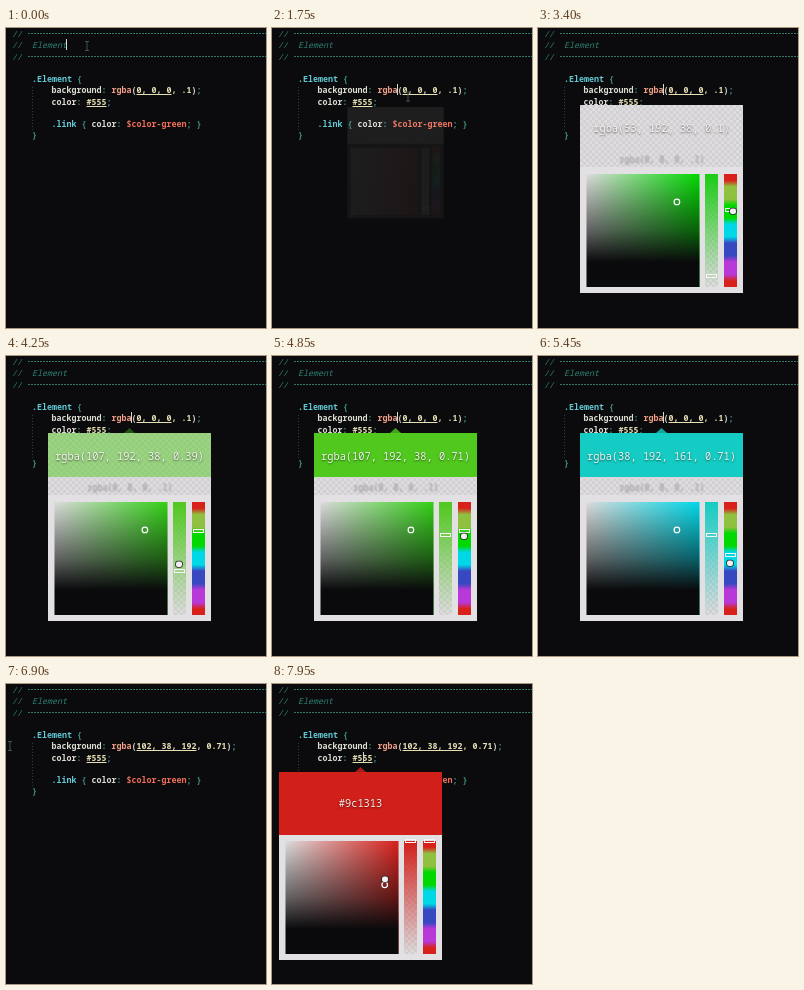
An HTML page with a canvas that plays this animation: 260x300 px, repeating every 8 s.

```html
<!DOCTYPE html>
<html lang="en">
<head>
<meta charset="utf-8">
<title>Inline color picker</title>
<style>
  html, body { margin: 0; width: 100%; height: 100%; overflow: hidden; background: #0b0b0d; }
  canvas { display: block; }
</style>
</head>
<body>
<canvas id="stage" width="260" height="300"></canvas>
<script>
const LOOP = 8000;
const ctx = document.getElementById('stage').getContext('2d');
const FAMILY = '"Noto Sans Mono", "DejaVu Sans Mono", monospace';
const CODE_SIZE = 8.33, CHAR = 5;
const INK = {
  comment: '#2f8072', selector: '#62c8d4', property: '#dcdcd4', mark: '#3f8f84',
  number: '#e6e0b4', variable: '#f0705c', func: '#f0a088'
};
// Spectrum colours, one every 60 degrees.
const HUES = [[216, 33, 27], [144, 192, 64], [0, 216, 0], [0, 216, 232], [56, 72, 192], [184, 56, 216], [216, 33, 27]];

const clamp = v => Math.max(0, Math.min(1, v));
const progress = (t, start, length) => clamp((t - start) / length);
const backOut = p => 1 + 2.7 * (p - 1) ** 3 + 1.7 * (p - 1) ** 2;
const mix = (a, b, u) => a.map((v, i) => Math.round(v + (b[i] - v) * u));

// Monotone cubic curve through [time, value] keys.
function track(keys) {
  const slope = keys.slice(1).map((k, i) => (k[1] - keys[i][1]) / (k[0] - keys[i][0]));
  const tangent = keys.map((_, i) => {
    const a = slope[i - 1] || 0, b = slope[i] || 0;
    return a * b > 0 ? 2 * a * b / (a + b) : 0;
  });
  return t => {
    if (t <= keys[0][0]) return keys[0][1];
    const j = keys.findIndex(k => k[0] >= t);
    if (j < 0) return keys[keys.length - 1][1];
    const i = j - 1, span = keys[j][0] - keys[i][0], u = (t - keys[i][0]) / span;
    return keys[i][1] * (1 - u) ** 2 * (1 + 2 * u) + keys[j][1] * u * u * (3 - 2 * u)
      + span * (tangent[i] * u * (1 - u) ** 2 + tangent[j] * u * u * (u - 1));
  };
}

const pointerPath = [
  [250, 81, 18], [1250, 136, 68], [1900, 136, 69], [2300, 104, 218], [2700, 138, 175],
  [2800, 138, 175], [3050, 194, 149], [3400, 195, 183], [3470, 194, 186], [3700, 193, 176],
  [3950, 173, 245], [4250, 173, 208], [4550, 173, 178], [4650, 173, 178], [4850, 192, 180],
  [5450, 192, 207], [5950, 192, 231], [6100, 192, 231], [6600, 4, 62], [6950, 4, 62],
  [7300, 91, 74], [7550, 91, 76], [7780, 70, 215], [7950, 113, 195]
];
const pointerX = track(pointerPath.map(([t, x]) => [t, x]));
const pointerY = track(pointerPath.map(([t, , y]) => [t, y]));

const pickers = [
  {
    left: 42, top: 77, open: 1710, close: 6620,
    hue: track([[3050, 0], [3400, 114], [3470, 120], [3700, 93.1], [4850, 93.1], [5450, 167.8], [5950, 264.8]]),
    sat: track([[2300, 0], [2700, .8]]),
    val: track([[2300, 0], [2700, .753]]),
    alpha: track([[3950, .1], [4250, .39], [4550, .71]]),
    previous: 'rgba(0, 0, 0, .1)'
  },
  {
    left: 7, top: 88, open: 7320, close: LOOP, hex: true,
    hue: () => 0,
    sat: track([[7700, 0], [7950, .878]]),
    val: track([[7700, .333], [7950, .612]]),
    alpha: () => 1
  }
];

function hsv(h, s, v) {
  return [5, 3, 1].map(n => {
    const k = (n + h / 60) % 6;
    return Math.round(255 * (v - v * s * Math.max(0, Math.min(k, 4 - k, 1))));
  });
}

// Banded spectrum: flat around each colour, with a short blend between.
function spectrumColor(h) {
  const i = Math.min(5, Math.floor(h / 60));
  return mix(HUES[i], HUES[i + 1], clamp((h / 60 - i - .5) * 3 + .5));
}
const css = (rgb, a = 1) => `rgba(${rgb.join(',')},${a})`;

function fill(x, y, w, h, style) {
  ctx.fillStyle = style;
  ctx.fillRect(x, y, w, h);
}

function gradient(x0, y0, x1, y1, stops) {
  const g = ctx.createLinearGradient(x0, y0, x1, y1);
  stops.forEach(([at, color]) => g.addColorStop(at, color));
  return g;
}

const checker = (() => {
  const tile = document.createElement('canvas');
  tile.width = tile.height = 6;
  const c = tile.getContext('2d');
  c.fillStyle = '#dedcde';
  c.fillRect(0, 0, 6, 6);
  c.fillStyle = '#d2d0d2';
  c.fillRect(0, 0, 3, 3);
  c.fillRect(3, 3, 3, 3);
  return ctx.createPattern(tile, 'repeat');
})();

const baseline = row => 9 + 11.27 * row;

// Draws [text, ink, underlined] runs from one column onwards.
function codeLine(x, row, runs, style = '600') {
  const y = baseline(row);
  ctx.font = `${style} ${CODE_SIZE}px ${FAMILY}`;
  for (const [text, ink, underlined] of runs) {
    ctx.fillStyle = INK[ink];
    ctx.fillText(text, x, y);
    if (underlined) ctx.fillRect(x, Math.round(y) + 1, text.length * CHAR, 1);
    x += text.length * CHAR;
  }
}

function dashed(x0, y0, x1, y1, dash, color) {
  ctx.beginPath();
  ctx.setLineDash(dash);
  ctx.moveTo(x0, y0);
  ctx.lineTo(x1, y1);
  ctx.lineWidth = 1;
  ctx.strokeStyle = color;
  ctx.stroke();
  ctx.setLineDash([]);
}

function drawEditor(t) {
  const changed = t >= 6650;
  fill(0, 0, 260, 300, '#0b0b0d');
  [0, 1, 2].forEach(row => codeLine(6, row, [['//', 'comment']], 'italic'));
  codeLine(26, 1, [['Element', 'comment']], 'italic');
  [5.5, 28.5].forEach(y => dashed(22, y, 260, y, [2, 1], '#2f786a'));
  dashed(26.5, 59, 26.5, 102, [1, 2], '#26443f');

  codeLine(26, 4, [['.Element', 'selector'], [' {', 'mark']]);
  codeLine(45.5, 5, [
    ['background', 'property'], [': ', 'mark'], ['rgba', 'func'], ['(', 'property'],
    [changed ? '102, 38, 192' : '0, 0, 0', 'number', true],
    [changed ? ', 0.71' : ', .1', 'number'], [')', 'property'], [';', 'mark']
  ]);
  codeLine(45.5, 6, [['color', 'property'], [': ', 'mark'], ['#555', 'number', true], [';', 'mark']]);
  codeLine(45.5, 8, [
    ['.link', 'selector'], [' { ', 'mark'], ['color', 'property'], [': ', 'mark'],
    ['$color-green', 'variable'], ['; }', 'mark']
  ]);
  codeLine(26, 9, [['}', 'mark']]);

  const caret = t < 1300 ? [60, 11] : t < 6650 ? [125, 56] : t >= 7300 ? [91, 68] : null;
  if (caret) fill(...caret, 1, 11, '#d8d8d0');
}

function label(text, x, y, size, color, shadow) {
  ctx.save();
  ctx.font = `500 ${size}px ${FAMILY}`;
  ctx.textAlign = 'center';
  ctx.shadowColor = shadow;
  ctx.shadowBlur = 2;
  ctx.shadowOffsetY = 1;
  ctx.fillStyle = color;
  ctx.fillText(text, x, y);
  ctx.restore();
}

function handle(x, y) {
  ctx.lineWidth = 1;
  ctx.strokeStyle = '#f4f4f4';
  ctx.strokeRect(x + 1.5, Math.round(y) - 1.5, 10, 3);
}

function drawPicker(p, t) {
  if (t < p.open || t > p.close + 220) return;
  const shown = progress(t, p.open, 400), gone = progress(t, p.close, 220);
  const scale = (.3 + .7 * backOut(shown)) * (1 - .4 * gone);
  const h = p.hue(t), s = p.sat(t), v = p.val(t), a = p.alpha(t);
  const rgb = hsv(h, s, v), pure = spectrumColor(h);
  const swatch = mix(rgb, pure, p.hex ? s : s * .6);
  const cover = clamp((a - .1) * 1.64);
  const headerHeight = p.hex ? 63 : 44;

  ctx.save();
  ctx.globalAlpha = clamp(shown * 2) ** 2 * (1 - gone);
  ctx.translate(p.left + 81.5, p.top + 5);
  ctx.scale(scale, scale);
  ctx.translate(-81.5, -5);

  ctx.beginPath();
  ctx.moveTo(76, 0);
  ctx.lineTo(81.5, -5);
  ctx.lineTo(87, 0);
  ctx.fillStyle = css(swatch, cover * .8);
  ctx.fill();

  fill(0, 0, 163, 188, '#e2e0e2');
  fill(0, 0, 163, 62, checker);
  fill(0, 0, 163, headerHeight, css(swatch, cover));
  const name = p.hex
    ? '#' + rgb.map(c => c.toString(16).padStart(2, '0')).join('')
    : `rgba(${rgb.join(', ')}, ${+a.toFixed(2)})`;
  label(name, 81.5, p.hex ? 35 : 27, 10.35, '#f4f4f0', 'rgba(0,0,0,.55)');
  if (p.previous) label(p.previous, 82, 57, CODE_SIZE, '#bcb8bc', 'rgba(0,0,0,.3)');

  const x = 6.5, y = 69, size = 113;
  fill(x, y, size, size, gradient(x, 0, x + size, 0, [[0, '#dcdcdc'], [1, css(pure)]]));
  fill(x, y, size, size, gradient(0, y, 0, y + size, [
    [0, 'rgba(10,10,12,0)'], [.5, 'rgba(10,10,12,.58)'], [.78, '#0a0a0c'], [1, '#0a0a0c']
  ]));
  ctx.beginPath();
  ctx.arc(x + s * size, y + (1 - v) * size, 2.8, 0, 7);
  ctx.lineWidth = 1.2;
  ctx.strokeStyle = '#fff';
  ctx.stroke();

  fill(125, y, 13, size, checker);
  fill(125, y, 13, size, gradient(0, y, 0, y + size, [[0, css(swatch)], [1, css(swatch, 0)]]));
  handle(125, y + (1 - a) * size);

  const bands = Array.from({ length: 37 }, (_, i) => [i / 36, css(spectrumColor(i * 10))]);
  fill(144, y, 13, size, gradient(0, y, 0, y + size, bands));
  handle(144, y + h / 360 * size);
  ctx.restore();
}

function drawPointer(t) {
  const x = pointerX(t), y = pointerY(t);
  const overPicker = pickers.some(p => t > p.open + 150 && t < p.close + 100
    && x > p.left && x < p.left + 163 && y > p.top && y < p.top + 188);
  ctx.save();
  ctx.translate(x, y);
  ctx.beginPath();
  if (overPicker) {
    ctx.roundRect(-3, -2.5, 6, 5.5, 2);
    ctx.lineWidth = 1.5;
    ctx.strokeStyle = '#222';
    ctx.stroke();
    ctx.fillStyle = '#f0f0f0';
    ctx.fill();
  } else {
    ctx.moveTo(-2, -4.5);
    ctx.lineTo(2, -4.5);
    ctx.moveTo(0, -4.5);
    ctx.lineTo(0, 4.5);
    ctx.moveTo(-2, 4.5);
    ctx.lineTo(2, 4.5);
    ctx.lineWidth = 1;
    ctx.strokeStyle = '#42544f';
    ctx.stroke();
  }
  ctx.restore();
}

function draw() {
  const t = performance.now() % LOOP;
  drawEditor(t);
  pickers.forEach(p => drawPicker(p, t));
  drawPointer(t);
  requestAnimationFrame(draw);
}
draw();
</script>
</body>
</html>
```
